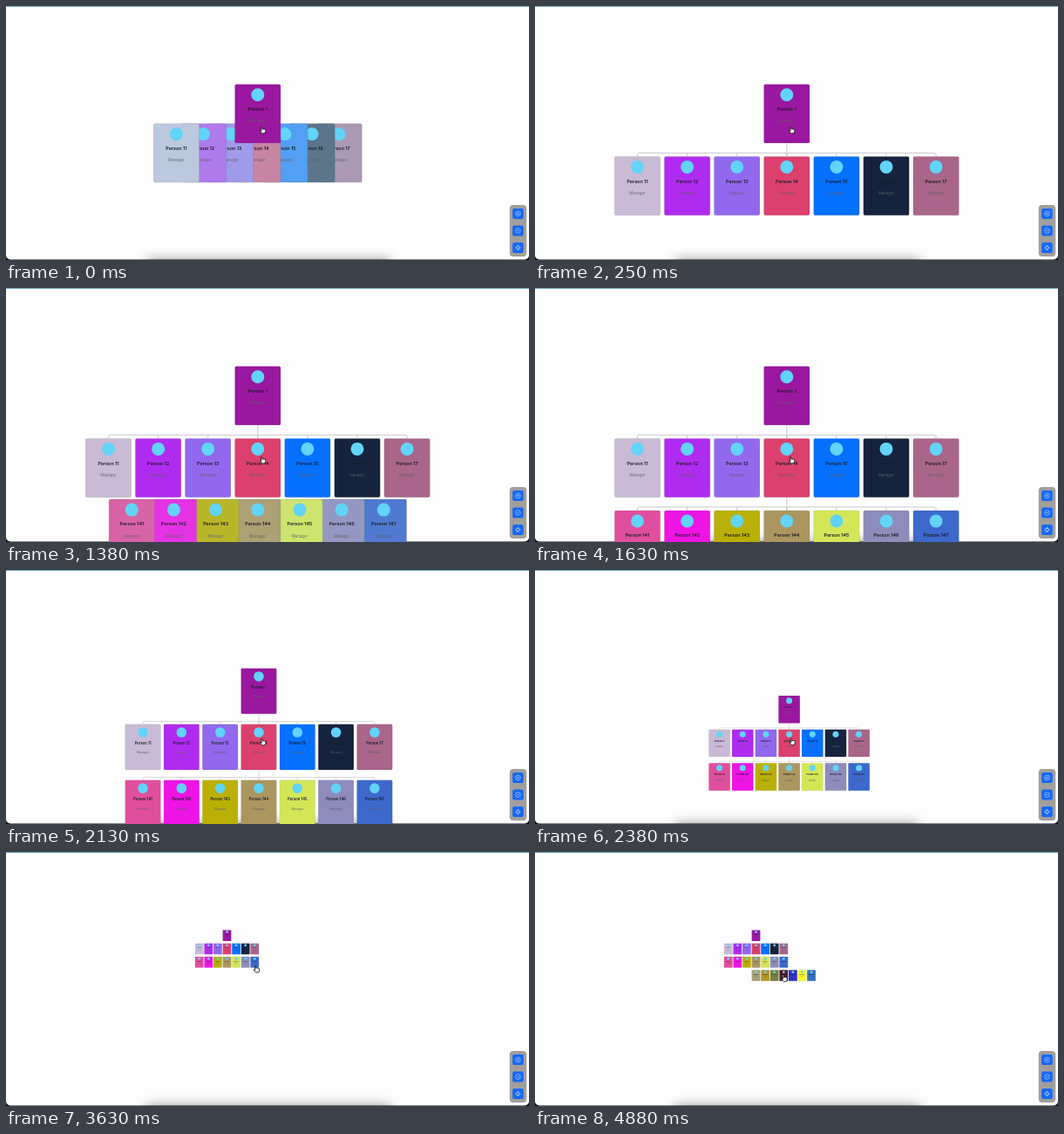
These frames come from a looping animation (600 px wide and 291 px high, 5.01 s). An HTML page with a canvas:

```html
<!DOCTYPE html>
<html lang="en">
<head>
<meta charset="utf-8">
<title>Organisation chart</title>
<style>
html, body { margin: 0; width: 100%; height: 100%; overflow: hidden; background: #fdfdfd; }
canvas { display: block; width: 600px; height: 291px; }
</style>
</head>
<body>
<canvas id="stage" width="600" height="291"></canvas>
<script>
const ctx = document.getElementById('stage').getContext('2d');
const LOOP = 5010, STEP = 125;
const CARD_W = 52.4, CARD_H = 67.3, GAP_X = 57.1, GAP_Y = 82.6;
const ROOT = { x: 288.8, y: 89.8 };
const ZOOM_AT = { x: 294.1, y: 191.7 };
const DRAG = { x: -39.6, y: -83.4, start: 3012, time: 400 };
const LIGHT_BLUE = [173, 216, 230];

// Each row opens from the given card of the row above.
const rows = [
  { id: '1', parent: 0, start: -265,
    colors: ['c9bad5', 'b02bf0', '9168ee', 'dc406c', '0670ff', '16233f', 'a9658a'] },
  { id: '14', parent: 0, start: 1000,
    colors: ['e04f9d', 'ee14e4', 'bab005', 'ac9660', 'd4e658', '8d8cba', '3d68cc'] },
  { id: '147', parent: 3, start: 3900,
    colors: ['a8a078', 'b09828', '788040', '501830', '3030c8', 'f4f828', '3870b8'] }
];

// Pointer stops: time, x, y
const stops = [
  [0, 294.5, 142], [250, 294.5, 142], [700, 284, 226], [900, 284, 226],
  [1125, 294.5, 197], [2000, 294.5, 197], [2375, 295, 196.5], [2820, 295, 196.5],
  [3012, 283.3, 176.6], [3412, 243.7, 93.2], [3625, 287.3, 134], [3700, 287.3, 134],
  [3850, 286, 144.5], [LOOP, 286, 144.5]
];

const hand = new Path2D('M-1.8-4.2q.8-.8 1.5 0V-1q.9-.5 1.4.2.9-.4 1.3.4 1.2-.3 1.2.8 0 2-1.2 4.1H-1.4L-3.8.9q-.2-1.1.9-.7l1.1 1z');

const clamp = v => Math.max(0, Math.min(1, v));
const mix = (a, b, p) => a + (b - a) * p;
const smooth = u => u * u * (3 - 2 * u);
const rgb = hex => [0, 2, 4].map(i => parseInt(hex.slice(i, i + 2), 16));

function tint(hex, p) {
  return `rgb(${rgb(hex).map((c, i) => Math.round(mix(LIGHT_BLUE[i], c, p)))})`;
}

function box(x, y, w, h, r, fill) {
  ctx.beginPath();
  ctx.roundRect(x, y, w, h, r);
  ctx.fillStyle = fill;
  ctx.fill();
}

function disc(x, y, r) {
  ctx.beginPath();
  ctx.arc(x, y, r, 0, 7);
}

function label(text, x, y, font, color) {
  ctx.font = font + ' Inter, Roboto, sans-serif';
  ctx.fillStyle = color;
  ctx.fillText(text, x, y);
}

function card(x, y, id, fill) {
  box(x - CARD_W / 2, y, CARD_W, CARD_H, 1.6, fill);
  ctx.strokeStyle = 'rgba(90,90,90,.25)';
  ctx.lineWidth = .5;
  ctx.stroke();
  disc(x, y + 12, 7.5);
  ctx.fillStyle = '#61d4f8';
  ctx.fill();
  label('Person ' + id, x, y + 28.5, '600 5.4px', '#1c1c26');
  label('Manager', x, y + 42.2, '400 4.4px', 'rgba(95,95,100,.85)');
}

function connector(px, py) {
  const y = py + 78.5, left = px - 3 * GAP_X, right = px + 3 * GAP_X;
  ctx.strokeStyle = '#c4c4c8';
  ctx.lineWidth = .9;
  ctx.beginPath();
  ctx.moveTo(px, py + CARD_H);
  ctx.lineTo(px, py + GAP_Y);
  ctx.moveTo(left, py + GAP_Y);
  ctx.arcTo(left, y, px, y, 2);
  ctx.arcTo(right, y, right, py + GAP_Y, 2);
  ctx.lineTo(right, py + GAP_Y);
  for (let i = -2; i < 3; i++) {
    ctx.moveTo(px + i * GAP_X, y);
    ctx.lineTo(px + i * GAP_X, py + GAP_Y);
  }
  ctx.stroke();
}

function tree(t) {
  const scale = Math.max(.1855, Math.exp(-Math.max(0, t - 2000) * .00203));
  const drag = clamp((t - DRAG.start) / DRAG.time);
  ctx.save();
  ctx.translate(ZOOM_AT.x + DRAG.x * drag, ZOOM_AT.y + DRAG.y * drag);
  ctx.scale(scale, scale);
  ctx.translate(-ZOOM_AT.x, -ZOOM_AT.y);
  // Parents and earlier siblings lie on top.
  for (let r = rows.length - 1; r >= 0; r--) {
    const row = rows[r], p = smooth(clamp((t - row.start) / 500));
    if (!p) continue;
    const px = ROOT.x + row.parent * GAP_X, py = ROOT.y + r * GAP_Y;
    if (p === 1) connector(px, py);
    for (let i = 6; i >= 0; i--)
      card(px + (i - 3) * GAP_X * p, py + GAP_Y * p, row.id + (i + 1), tint(row.colors[i], p));
  }
  card(ROOT.x, ROOT.y, '1', '#9a17a0');
  ctx.restore();
}

function panel() {
  const x = 587.4;
  box(577.8, 228, 19.4, 59, 4, '#a09f9c');
  ctx.strokeStyle = 'rgba(255,255,255,.8)';
  ctx.lineWidth = .6;
  [238, 257.5, 277].forEach((y, i) => {
    box(x - 6.3, y - 6.1, 12.6, 12.2, 2, '#1668f8');
    disc(x, y, i < 2 ? 2.8 : 2);
    if (i < 2) {
      ctx.moveTo(x - 1.2, y);
      ctx.lineTo(x + 1.2, y);
    }
    if (i === 0) {
      ctx.moveTo(x, y - 1.2);
      ctx.lineTo(x, y + 1.2);
    }
    if (i === 2) {
      for (const [dx, dy] of [[1, 0], [-1, 0], [0, 1], [0, -1]]) {
        ctx.moveTo(x + dx, y + dy);
        ctx.lineTo(x + dx * 3, y + dy * 3);
      }
    }
    ctx.stroke();
  });
}

function backdrop() {
  ctx.fillStyle = '#0b0d14';
  ctx.fillRect(0, 0, 600, 291);
  box(0, 0, 600, 290.5, [0, 0, 5, 5], '#fdfdfd');
  ctx.fillStyle = '#6ba6ba';
  ctx.fillRect(0, 0, 600, 1);
  ctx.save();
  ctx.shadowColor = 'rgba(0,0,0,.45)';
  ctx.shadowBlur = 14;
  box(161, 291, 280, 12, 4, '#ccc');
  ctx.restore();
}

function pointer(t) {
  const n = stops.findIndex(s => s[0] > t);
  const [t0, x0, y0] = stops[n - 1], [t1, x1, y1] = stops[n];
  const u = (t - t0) / (t1 - t0);
  ctx.save();
  ctx.translate(mix(x0, x1, u), mix(y0, y1, u));
  ctx.lineJoin = 'round';
  if (t > 2900 && t < 3500) {
    ctx.fillStyle = '#111';
    for (let i = 0; i < 4; i++) {
      ctx.fillRect(-.5, -2.5, 1, 3);
      ctx.beginPath();
      ctx.moveTo(0, -3.6);
      ctx.lineTo(1.6, -1.8);
      ctx.lineTo(-1.6, -1.8);
      ctx.fill();
      ctx.rotate(Math.PI / 2);
    }
  } else {
    ctx.rotate(-.2);
    ctx.scale(.88, .88);
    ctx.fillStyle = '#fff';
    ctx.strokeStyle = '#111';
    ctx.lineWidth = .9;
    ctx.fill(hand);
    ctx.stroke(hand);
  }
  ctx.restore();
}

function draw(now) {
  // The picture advances in discrete steps.
  const t = STEP * Math.min(39, Math.floor((now % LOOP + 3) / STEP));
  ctx.textAlign = 'center';
  ctx.textBaseline = 'middle';
  backdrop();
  tree(t);
  panel();
  pointer(t);
}

const begin = performance.now();
function tick() {
  draw(performance.now() - begin);
  requestAnimationFrame(tick);
}
tick();
</script>
</body>
</html>
```
